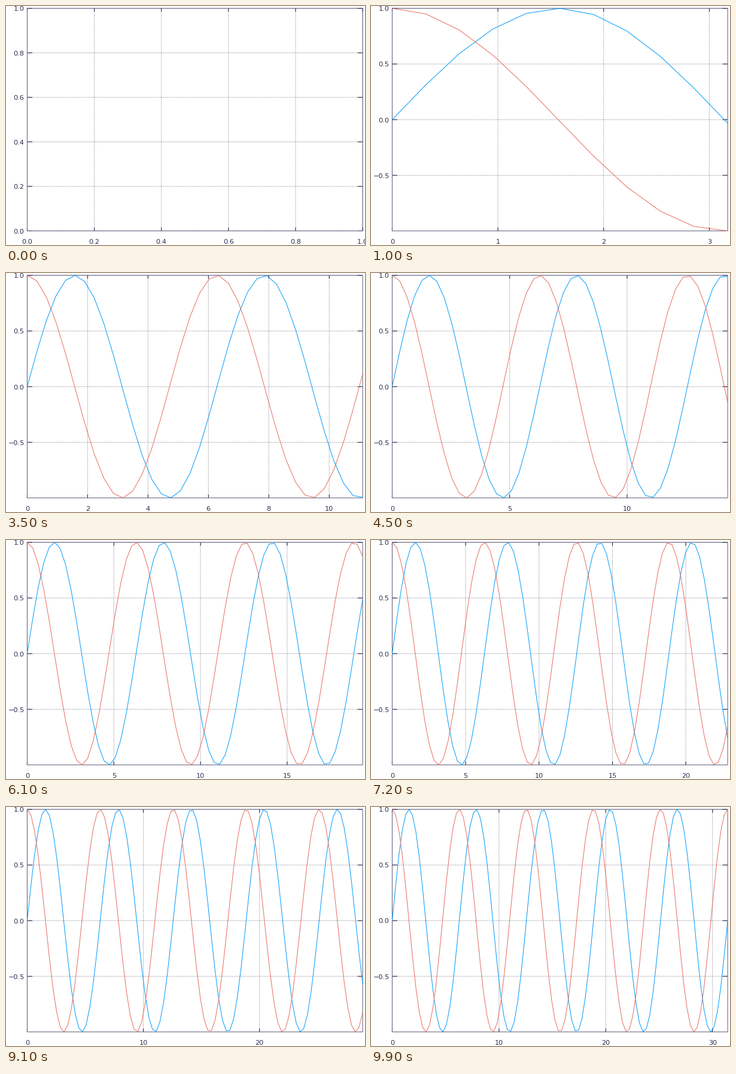
Recreate the animation shown at these times as a matplotlib script. Size 600 by 400 pixels, loop 10000 ms.

```python
import numpy as np
import matplotlib.pyplot as plt
from matplotlib.animation import FuncAnimation

W, H, DPI = 600, 400, 100
FRAMES, INTERVAL = 100, 100
PX = 72 / DPI
MM = DPI / 25.4
LEFT, RIGHT, TOP, BOTTOM = 9 * MM, W - MM, MM, H - 6 * MM
TICK_X = 0.015 * (BOTTOM - TOP)
TICK_Y = 0.015 * (RIGHT - LEFT)

INK, TEXT = "#14143c", "#2a2a4e"
FRAME, GRID = "#5e5e7c", "#5c5c76"
BLUE, CORAL = "#009afa", "#e86c60"

# step mantissas and how nice each one is
NICE = {1: 1.0, 5: 0.9, 2: 0.7, 2.5: 0.499, 3: 0.2}

x = np.linspace(0, 10 * np.pi, FRAMES)
curves = [(np.sin(x), BLUE), (np.cos(x), CORAL)]

plt.rcParams["font.family"] = "DejaVu Sans"
plt.rcParams["path.snap"] = False
fig = plt.figure(figsize=(W / DPI, H / DPI), dpi=DPI, facecolor="white")
ax = fig.add_axes([0, 0, 1, 1])


def tick_step(lo, hi):
    """Step with the best mix of tick count, coverage and niceness."""
    best, best_score = None, -np.inf
    extent = hi - lo
    for power in (1, 0, -1, -2):
        for count in range(5, 9):
            for mantissa, nice in NICE.items():
                step = mantissa * 10.0 ** power
                span = (count - 1) * step
                covers = np.floor(lo / step) + count - 1 >= hi / step - 1e-9
                if not covers or span >= 2 * extent:
                    continue
                score = (1 - abs(count - 5) / 5) / 4 + extent / span / 2 + nice / 4
                if score > best_score:
                    best, best_score = step, score
    return best


def ticks(lo, hi):
    step = tick_step(lo, hi)
    first = np.ceil(lo / step - 1e-9)
    last = np.floor(hi / step + 1e-9)
    values = np.arange(first, last + 1) * step + 0.0
    digits = next(d for d in range(4) if abs(step - round(step, d)) < 1e-9)
    return [(v, f"{v:.{digits}f}".replace("-", "\u2212")) for v in values]


def segment(xs, ys, color, **style):
    ax.plot(xs, ys, color=color, lw=PX, solid_capstyle="butt", **style)


def label(px, py, text, align):
    ax.text(px, py, text, color=TEXT, size=11.2 * PX, ha=align, va="baseline")


def draw(i):
    ax.cla()
    ax.set(xlim=(0, W), ylim=(H, 0))
    ax.axis("off")

    x_max = x[i] or 1.0
    y_min = min(0, min(y[: i + 1].min() for y, _ in curves))
    to_x = lambda v: LEFT + (RIGHT - LEFT) * v / x_max
    to_y = lambda v: BOTTOM - (BOTTOM - TOP) * (v - y_min) / (1 - y_min)
    x_ticks, y_ticks = ticks(0, x_max), ticks(y_min, 1)

    dots = dict(linestyle=(0, (1, 2)), dash_capstyle="butt")
    for v, _ in x_ticks:
        segment([to_x(v)] * 2, [BOTTOM, TOP], GRID, **dots)
    for v, _ in y_ticks:
        segment([LEFT, RIGHT], [to_y(v)] * 2, GRID, **dots)

    for v, text in x_ticks:
        px = to_x(v)
        segment([px] * 2, [BOTTOM, BOTTOM - TICK_X], INK)
        segment([px] * 2, [TOP, TOP + TICK_X], INK)
        label(px, 398, text, "center")
    for v, text in y_ticks:
        py = to_y(v)
        segment([LEFT, LEFT + TICK_Y], [py] * 2, INK)
        segment([RIGHT, RIGHT - TICK_Y], [py] * 2, INK)
        label(30.6, py + 4.3, text, "right")

    segment([LEFT, RIGHT, RIGHT, LEFT, LEFT],
            [BOTTOM, BOTTOM, TOP, TOP, BOTTOM], FRAME)

    if i:
        for y, color in curves:
            segment(to_x(x[: i + 1]), to_y(y[: i + 1]), color)
    return []


anim = FuncAnimation(fig, draw, frames=FRAMES, init_func=lambda: [],
                     interval=INTERVAL, repeat=True, repeat_delay=0)
plt.show()
```
